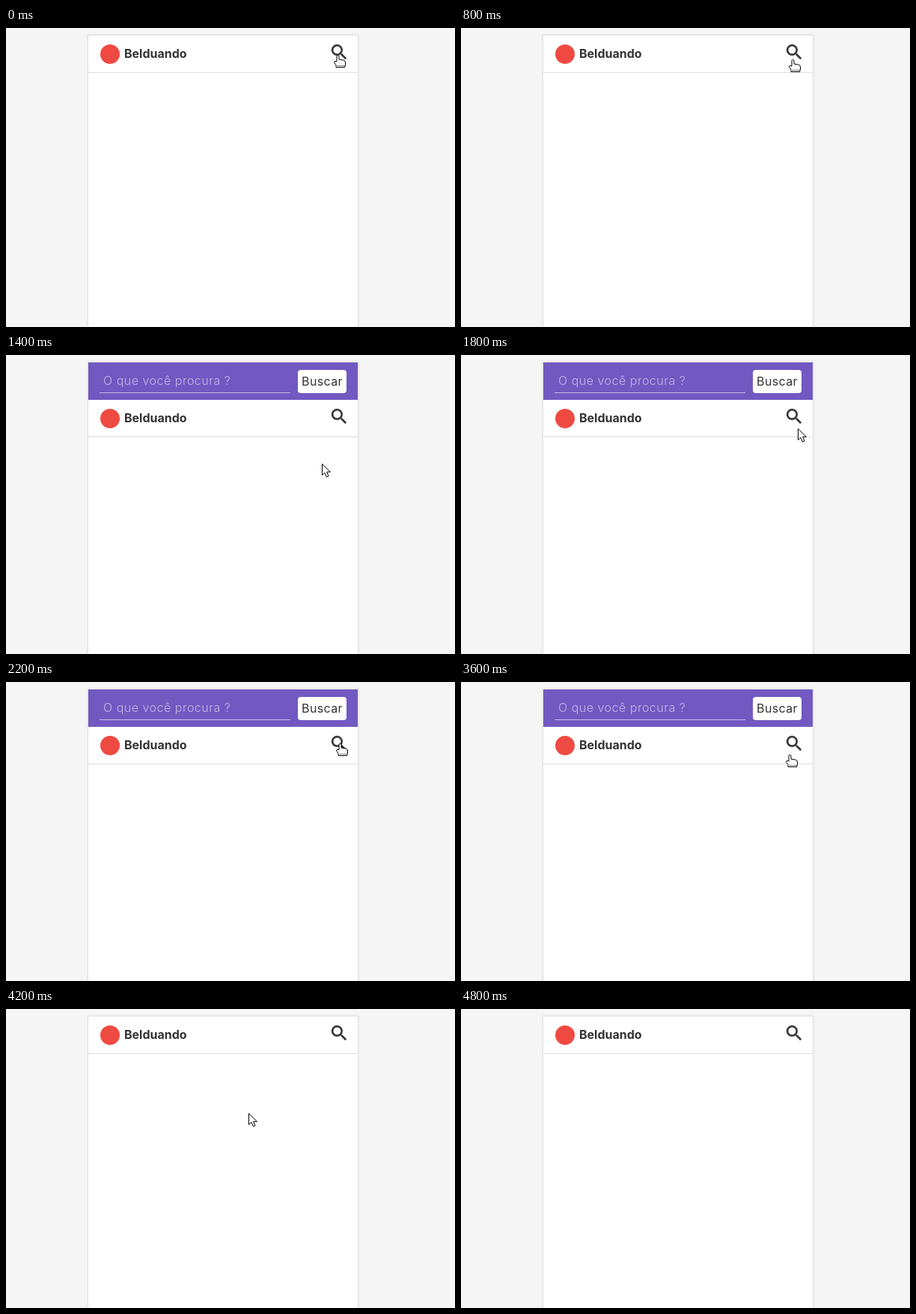
These frames come from a looping animation (600x400 px, 4.9 s). An HTML page:

```html
<!DOCTYPE html>
<html lang="pt-BR">
<head>
<meta charset="utf-8">
<title>Busca</title>
<style>
  html, body { margin: 0; height: 100%; overflow: hidden; background: #f5f5f5; }
  svg { display: block; }
  text { font: 16px Inter, "Open Sans", sans-serif; fill: #333; }
  .name { font-weight: 700; }
  .hint { font-weight: 300; fill: #c3b7e8; letter-spacing: .5px; }
  .button { letter-spacing: .35px; text-anchor: middle; }
  .card { fill: #fff; stroke: #e0e0e0; filter: drop-shadow(0 0 1.5px rgba(0, 0, 0, .08)); }
  .pointer { fill: #fff; stroke: #000; stroke-linejoin: round; }
</style>
</head>
<body>
<svg width="600" height="400">
  <rect class="card" x="109.5" y="9.5" width="361" height="420"/>

  <g id="header">
    <circle cx="139" cy="35" r="13" fill="#ef4a41"/>
    <text class="name" x="158" y="40">Belduando</text>
    <path transform="translate(431.6 18.6) scale(1.143)" fill="#333" stroke="#333" stroke-width=".3"
      d="M15.5 14h-.8l-.3-.3A6.5 6.5 0 1 0 13.7 14.4l.3.3v.8l5 5L20.5 19ZM9.5 14a4.5 4.5 0 1 1 0-9a4.5 4.5 0 0 1 0 9Z"/>
    <path d="M110 59.5H470" stroke="#ddd"/>
  </g>

  <svg id="bar" x="110" y="10" width="360" height="0">
    <rect width="360" height="50" fill="#7159c1"/>
    <g id="form">
      <text class="hint" x="20" y="30">O que você procura ?</text>
      <path d="M15 40.5H270" stroke="#c6bde6"/>
      <rect x="280" y="10" width="65" height="31" rx="4" fill="#fff"/>
      <text class="button" x="312.5" y="31">Buscar</text>
    </g>
  </svg>

  <g id="cursor">
    <path id="arrow" class="pointer" d="M.5 .8V15.7L4 12.6L6.4 18.2L9 17.1L6.7 11.6H11.4Z"/>
    <g id="hand">
      <path class="pointer" d="M4 9V2a1.5 1.5 0 0 1 3 0V6L13.5 7.2Q15.5 7.8 15.5 10V13L14.7 16.5H3V13.5L.8 10.6Q0 8.6 2 8.3Z"/>
      <path d="M5 14.5H14" stroke="#000" stroke-dasharray="1 1"/>
    </g>
  </g>
</svg>
<script>
const LOOP = 4900, STEP = 100, BAR = 50;
const el = id => document.getElementById(id);

// Pointer waypoints: time, x, y, shape
const path = [
  [0, 438, 36, 'hand'], [100, 438, 36, 'hand'], [200, 439, 37, 'hand'], [700, 439, 37, 'hand'],
  [800, 438, 42, 'hand'], [900, 432, 66, 'arrow'], [1000, 425, 89, 'arrow'],
  [1300, 423, 126, 'arrow'], [1400, 422, 145, 'arrow'], [1500, 421, 145, 'arrow'],
  [1800, 450, 98, 'arrow'], [1900, 443, 84, 'hand'], [2000, 443, 83, 'hand'],
  [2100, 443, 83, 'hand'], [2200, 441, 82, 'hand'], [3500, 441, 82, 'hand'],
  [3600, 434, 97, 'hand'], [3700, 422, 130, 'arrow'], [3800, 400, 178, 'arrow'],
  [3900, 398, 180, 'arrow'], [4000, 398, 180, 'arrow'], [4100, 396, 185, 'arrow'],
  [4500, 107, 0, 'arrow'], [4600, 107, -30, 'arrow'], [LOOP, 107, -30, 'arrow']
];

// The CSS "ease" curve, cubic-bezier(.25, .1, .25, 1)
function ease(p) {
  if (p <= 0 || p >= 1) return p <= 0 ? 0 : 1;
  const bezier = (a, b, s) => 3 * a * s * (1 - s) ** 2 + 3 * b * s * s * (1 - s) + s ** 3;
  let low = 0, high = 1;
  for (let i = 0; i < 20; i++) {
    const mid = (low + high) / 2;
    if (bezier(.25, .25, mid) < p) low = mid; else high = mid;
  }
  return bezier(.1, 1, low);
}

const move = (id, x, y) => el(id).setAttribute('transform', `translate(${x} ${y})`);

function drawBar(t) {
  const open = ease((t - 800) / 300) - ease((t - 3732) / 200);
  const height = Math.round(BAR * open);
  el('bar').setAttribute('height', height);
  move('form', 0, (height - BAR) / 2);
  move('header', 0, height);
}

function drawCursor(t) {
  const next = path.findIndex(point => point[0] > t);
  const [t0, x0, y0, shape] = path[next - 1], [t1, x1, y1] = path[next];
  const k = (t - t0) / (t1 - t0);
  move('cursor', Math.round(x0 + (x1 - x0) * k), Math.round(y0 + (y1 - y0) * k));
  for (const id of ['arrow', 'hand']) el(id).style.display = id === shape ? '' : 'none';
}

function draw() {
  const t = Math.floor(performance.now() % LOOP / STEP) * STEP;
  drawBar(t);
  drawCursor(t);
  requestAnimationFrame(draw);
}
draw();
</script>
</body>
</html>
```
